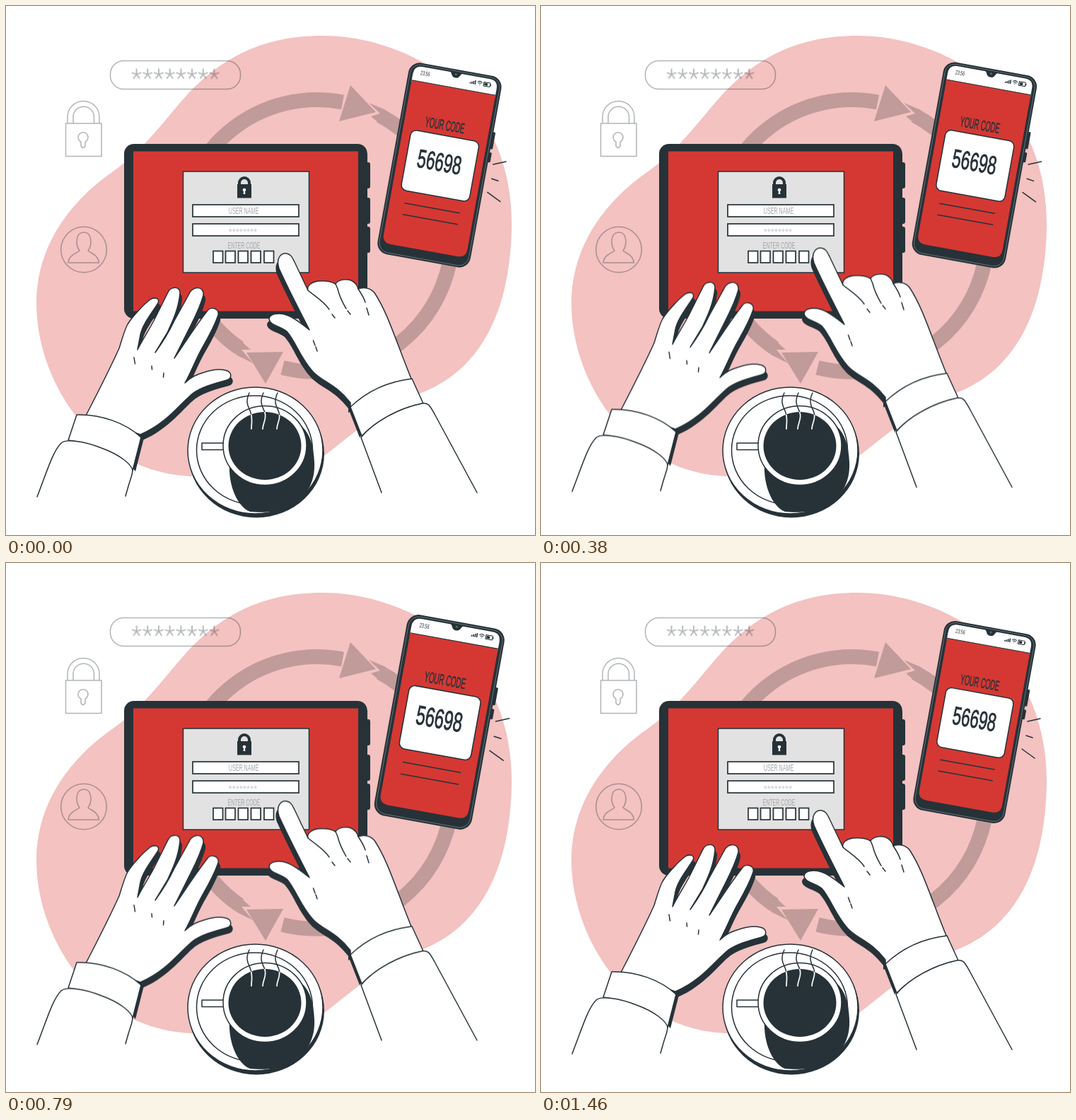
An HTML page for the animation above (1500 ms loop, 748 px wide and 748 px high).

```html
<!DOCTYPE html>
<html lang="en">
<head>
<meta charset="utf-8">
<title>Login code</title>
<style>
  html, body { margin: 0; width: 100%; height: 100%; overflow: hidden; background: #fff; }
  svg { display: block; width: 100vw; height: 100vh; }
  text { font-family: "Liberation Sans", Arial, sans-serif; text-anchor: middle; }
  .ink { fill: #263238; }
  .red { fill: #d53833; }
  .line { fill: none; stroke: #263238; stroke-width: 1.5; stroke-linecap: round; stroke-linejoin: round; }
  .paper { fill: #fff; stroke: #263238; stroke-width: 1.5; stroke-linejoin: round; }
  .faint { opacity: .36; }
  .ring { fill: none; stroke: #c19b99; stroke-width: 21; }
  .head { fill: #c19b99; }
  .label { fill: #a3a6a8; }
  .hands { animation: float 1.5s linear infinite; }
  .phone { transform-origin: 616.5px 225px; animation: beat 1.5s -16ms linear infinite; }
  @keyframes float {
    0%, 97.3%, 100% { transform: translateY(0); }
    48.3% { transform: translateY(-14.5px); }
  }
  @keyframes beat {
    0%, 30%, 40%, 60%, 100% { transform: scale(1); }
    10%, 50% { transform: scale(1.1); }
  }
</style>
</head>
<body>
<svg viewBox="0 0 748 748">
  <defs>
    <pattern id="star" width="15.7" height="20" patternUnits="userSpaceOnUse">
      <path d="M7.85 10V2M7.85 10L1.2 7.8M7.85 10L14.5 7.8M7.85 10L3.5 16.3M7.85 10L12.2 16.3" fill="none" stroke="#263238" stroke-width="1.8"/>
    </pattern>
    <rect id="stars" width="125.6" height="20" fill="url(#star)"/>
    <path id="steam" class="line" d="M344 547C337 562 344 568 346 575C349 584 347 590 347 598M364 547C357 562 364 568 366 575C369 584 363 590 363 598M384 547C377 562 384 568 386 575C389 584 383 590 383 598"/>
    <ellipse id="coffee" cx="366" cy="622" rx="51.5" ry="48"/>
    <clipPath id="inCoffee"><use href="#coffee"/></clipPath>
    <path id="leftHand" d="M113 579C128 550 146 515 160 484C165 468 168 457 172 450C180 437 196 421 204 415C210 411 218 413 215 420C205 436 193 450 190 465L186 486C194 470 200 462 209 445L229 405C233 396 247 396 246 406C244 428 236 445 228 462L211 490C222 475 230 462 238 445L259 407C264 395 281 396 279 409C274 428 266 442 257 460L238 498C252 478 264 458 284 432C289 424 302 427 300 437C294 455 285 470 277 484C268 500 263 515 253 533C262 524 270 521 280 518C292 514 302 513 310 515C320 517 320 527 312 529C298 533 280 537 265 547C248 560 228 590 190 606Z"/>
    <path id="rightHand" d="M487 561C466 534 448 532 434 517C416 497 410 475 397 460C386 452 374 452 372 443C372 435 386 433 397 437C408 441 418 449 429 458C420 440 400 402 386 371C381 355 390 349 397 350C403 351 405 356 408 362L427 402C425 395 433 390 441 389C452 388 461 390 466 393C470 386 482 386 488 388C494 391 497 396 498 400C505 397 516 398 522 407C540 435 550 470 573 527L487 567Z"/>
    <path id="leftCuff" d="M100 578C135 577 170 590 191 610L179 657C160 632 115 617 88 614Z"/>
    <path id="rightCuff" d="M487 567C510 545 540 531 574 527L590 562C560 567 525 585 503 608Z"/>
  </defs>

  <path fill="#f3c2c1" d="M448 42C530 42 620 82 665 145C700 195 715 250 715 310C714 400 690 505 590 546C530 568 490 605 450 636C390 672 280 668 240 663C190 656 150 632 120 603C75 560 43 490 43 420C43 345 85 280 150 235C185 210 210 180 235 150C285 88 345 42 448 42Z"/>

  <!-- circling arrows -->
  <path class="ring" d="M247 330A192.5 192.5 0 0 1 476 136M529 155A192.5 192.5 0 0 1 391 511.4M330 483.7A192.5 192.5 0 0 1 247 330"/>
  <path class="head" d="M487 112L523 150L471 163ZM513 137L529 152L516 156L528 166L537 147ZM392 489L367 534L340 490ZM349 505L333 486L346 486L327 469L325 493Z"/>

  <!-- outlined icons -->
  <g class="faint">
    <rect class="line" x="147.5" y="77.5" width="184" height="40" rx="19"/>
    <use href="#stars" x="0" y="0" transform="translate(176.7 86.5)"/>
    <path class="line" d="M84.5 166H135V212.500H84.500ZM87 166V157A22.500 22.500 0 0 1 132 157V166M95 166V157A14.700 14.700 0 0 1 124.500 157V166M106 192V198Q109 203 112 198V192A7 7 0 1 0 106 192Z"/>
    <circle class="line" cx="110" cy="344.500" r="32.300"/>
    <path class="line" d="M88 363C89 352 99 350 104 346C98 338 98 320 110 320C122 320 122 338 116 346C121 350 130 352 131.500 363Z"/>
  </g>

  <!-- tablet -->
  <g class="ink">
    <rect x="167" y="195" width="344" height="247" rx="14"/>
    <rect x="504" y="221" width="11" height="37" rx="3"/>
    <rect x="504" y="271" width="11" height="37" rx="3"/>
    <rect x="504" y="312" width="11" height="37" rx="3"/>
  </g>
  <rect class="red" x="180" y="205.500" width="318" height="226"/>
  <rect class="line" x="250.500" y="234" width="178" height="143" style="fill:#e2e2e2"/>
  <rect class="ink" x="327" y="252" width="20" height="19.500"/>
  <path class="line" style="stroke-width:4;stroke-linecap:butt" d="M330 253V250A7 7 0 0 1 344 250V253"/>
  <path d="M336 262L335.600 266H338.400L338 262A2.300 2.300 0 1 0 336 262Z" fill="#fff"/>
  <g class="paper" style="stroke-width:1.7;stroke-linejoin:miter">
    <rect x="264" y="281" width="150" height="17"/>
    <rect x="264" y="308" width="150" height="17"/>
    <rect x="293" y="346.500" width="13.500" height="16.500"/>
    <rect x="310.500" y="346.500" width="13.500" height="16.500"/>
    <rect x="328.500" y="346.500" width="13.500" height="16.500"/>
    <rect x="346.500" y="346.500" width="13.500" height="16.500"/>
    <rect x="365" y="346.500" width="13.500" height="16.500"/>
  </g>
  <g class="label" font-size="13.500">
    <text transform="translate(336 294.300) scale(.53 1)">USER NAME</text>
    <text transform="translate(336.500 342.500) scale(.52 1)">ENTER CODE</text>
  </g>
  <use href="#stars" opacity=".42" transform="translate(314.700 314) scale(.322)"/>

  <!-- coffee -->
  <ellipse class="ink" cx="354" cy="633" rx="96" ry="90.500"/>
  <ellipse class="paper" cx="352.500" cy="628.500" rx="95.500" ry="89.500"/>
  <ellipse class="line" cx="351.500" cy="628" rx="82" ry="77"/>
  <path class="ink" d="M316 645C314 680 328 708 345 715C362 717 390 716 405 706C432 688 437 665 436 645C435 622 430 605 418 594Z"/>
  <rect class="paper" x="277" y="618" width="34" height="9.500"/>
  <ellipse class="paper" cx="366" cy="621.500" rx="59" ry="56"/>
  <use href="#coffee" class="ink"/>
  <use href="#steam"/>
  <g clip-path="url(#inCoffee)">
    <path d="M344 547C337 562 344 568 346 575C349 584 347 590 347 598M364 547C357 562 364 568 366 575C369 584 363 590 363 598M384 547C377 562 384 568 386 575C389 584 383 590 383 598" fill="none" stroke="#fff" stroke-width="1.700" stroke-linecap="round"/>
  </g>

  <!-- phone -->
  <g class="phone">
    <path class="line" d="M688 224L706 220M686 244L695 247M680 263L698 276"/>
    <g transform="translate(613 225) rotate(10.300)">
      <g class="ink">
        <rect x="62" y="-59" width="7" height="24" rx="1.500"/>
        <rect x="62" y="-30" width="7" height="14" rx="1.500"/>
        <rect x="-66" y="-136" width="132" height="272" rx="16"/>
      </g>
      <rect x="-63.500" y="-133.500" width="127" height="267" rx="14" fill="none" stroke="#7b8488" stroke-width=".7"/>
      <path fill="#fff" d="M-59.500 -108V-119Q-59.500 -131 -48 -131H48Q59.500 -131 59.500 -119V-108Z"/>
      <path class="red" d="M-59.500 -110H59.500V109Q59.500 121 47 121H-47Q-59.500 121 -59.500 109Z"/>
      <path class="line" style="stroke-width:1" d="M-59.500 -110H59.500"/>
      <path class="ink" d="M-10 -132C-5 -131 -7 -124 0 -124C7 -124 5 -131 10 -132Z"/>
      <circle cx="0" cy="-129" r="1.500" fill="#5d676c"/>
      <text class="ink" font-size="8.500" transform="translate(-42.500 -119.500) scale(.62 1)">23:56</text>
      <path class="ink" d="M21 -120v-2h1.500v2zM23.300 -120v-3.200h1.500v3.200zM25.600 -120v-4.400h1.500v4.400zM27.900 -120v-5.600h1.500v5.600z"/>
      <path class="line" style="stroke-width:1" d="M32 -124Q35 -127 38 -124M33.400 -122.300Q35 -124 36.600 -122.300M35 -120.600v.1M40.500 -125.500h9v5.500h-9zM50.600 -123.600v1.700"/>
      <path class="ink" d="M41.500 -124.500h4.500v3.500h-4.500z"/>
      <text class="ink" font-size="20" stroke="#263238" stroke-width=".5" transform="translate(-2.500 -49.500) scale(.46 1)">YOUR CODE</text>
      <rect class="paper" x="-47.500" y="-42" width="97" height="85.500" rx="8"/>
      <text class="ink" font-size="36" stroke="#263238" stroke-width=".9" transform="translate(-.8 8) scale(.62 1)">56698</text>
      <path class="line" d="M-38 61H39.500M-38 77H39.500"/>
    </g>
  </g>

  <!-- hands -->
  <g class="hands">
    <use href="#leftCuff" class="ink" x="4" y="1"/>
    <use href="#leftHand" class="ink" x="3" y="8"/>
    <use href="#leftHand" class="paper"/>
    <use href="#leftCuff" class="paper"/>
    <path class="paper" stroke-linecap="round" d="M44 694C58 658 66 630 78 618C84 612 110 615 135 625C160 634 178 648 179 657L178 663C175 672 172 682 169 693"/>
    <path class="line" d="M181 497L182.500 506M206 509L206.500 514M223 519L222.500 525"/>

    <use href="#rightCuff" class="ink" x="-3" y="2"/>
    <use href="#rightHand" class="ink" x="-3" y="8"/>
    <use href="#rightHand" class="paper"/>
    <use href="#rightCuff" class="paper"/>
    <path class="paper" stroke-linecap="round" d="M531 688L502 610C520 588 555 569 588 562C598 560 600 567 606 577L666 688"/>
    <path class="line" d="M427 402C436 410 449 417 457 429M461 436L465 441M466 393L469 400C472 413 477 421 481 428M483 431L487 436M498 400C503 408 506 412 508 419M510 427L513 437M434.500 473L437 480M438 482L440 488"/>
  </g>
</svg>
</body>
</html>
```
